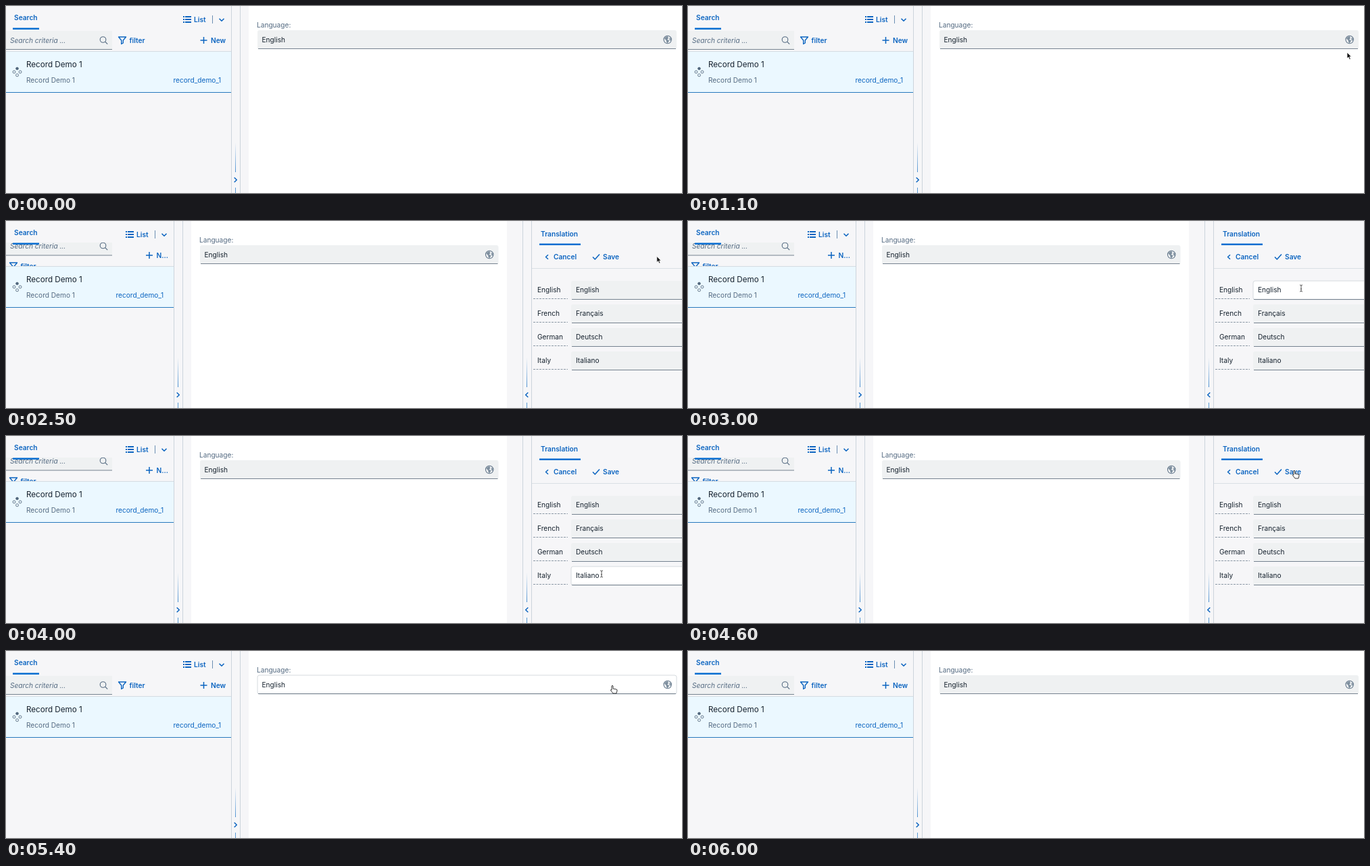
Animation, 1000 px wide and 278 px high, one loop 6800 ms. Source, as an HTML page with a canvas:

```html
<!DOCTYPE html>
<html lang="en">
<head>
<meta charset="utf-8">
<title>Translation panel</title>
<style>
  html, body { margin: 0; width: 100%; height: 100%; overflow: hidden; background: #fff; }
  canvas { display: block; width: 1000px; height: 278px; }
</style>
</head>
<body>
<canvas id="stage"></canvas>
<script>
const WIDTH = 1000, HEIGHT = 278, LOOP = 6800, STEP = 100;
const BLUE = '#0b64c0', INK = '#16222e', LABEL = '#556b82', GREY = '#f6f6f8';
const FIELD = '#eff1f2', EDGE = '#ccd4dc', RULE = '#75828f';
const FONT = 'Inter, "Liberation Sans", sans-serif';

// Time, right edge of the search panel, right edge of the form.
const LAYOUT = [[0, 333, 1004.5], [2100, 333, 1004.5], [2200, 262, 790], [2300, 248, 741],
  [4800, 248, 741], [4900, 262, 785], [5000, 301, 904], [5100, 326, 983], [5200, 333, 1004.5]];

// Time, tip x, tip y.
const POINTER = [[600, 992, 262], [800, 988, 165], [1000, 979, 88], [1100, 975, 69],
  [1200, 978, 54], [1400, 983, 47], [1800, 976, 47], [2200, 974.5, 49], [2400, 972, 50],
  [2800, 935, 60], [2900, 920, 80], [3000, 907, 100], [3300, 893, 122], [3500, 885, 156],
  [3600, 882, 168], [3800, 880, 199], [4000, 881, 205], [4100, 882, 165], [4200, 884, 108],
  [4300, 887, 82], [4400, 891, 58], [4500, 896, 40], [4600, 896, 51], [5500, 896, 51],
  [5600, 895, 82], [5900, 890, 198]];

const ROWS = [['English', 'English'], ['French', 'Français'], ['German', 'Deutsch'], ['Italy', 'Italiano']];

const canvas = document.getElementById('stage');
const ratio = window.devicePixelRatio || 1;
canvas.width = WIDTH * ratio;
canvas.height = HEIGHT * ratio;
const ctx = canvas.getContext('2d');
ctx.scale(ratio, ratio);

function sample(keys, time, column) {
  const next = keys.findIndex(key => key[0] > time);
  if (next < 0) return keys[keys.length - 1][column];
  if (next === 0) return keys[0][column];
  const a = keys[next - 1], b = keys[next];
  return a[column] + (b[column] - a[column]) * (time - a[0]) / (b[0] - a[0]);
}

function box(x, y, w, h, color) {
  ctx.fillStyle = color;
  ctx.fillRect(x, y, w, h);
}

function text(string, x, y, { color = INK, size = 10.15, style = '', align = 'left' } = {}) {
  ctx.font = `${style} ${size}px ${FONT}`;
  ctx.fillStyle = color;
  ctx.textAlign = align;
  ctx.fillText(string, x, y);
}

const bold = (string, x, y) => text(string, x, y, { color: BLUE, style: '600', size: 10.2 });

function stroke(path, x, y, color = BLUE, width = 1.5, fill) {
  ctx.save();
  ctx.translate(x, y);
  const shape = new Path2D(path);
  if (fill) {
    ctx.fillStyle = fill;
    ctx.fill(shape);
  }
  ctx.strokeStyle = color;
  ctx.lineWidth = width;
  ctx.lineJoin = 'round';
  ctx.stroke(shape);
  ctx.restore();
}

function ring(x, y, r, color, width, fill) {
  ctx.beginPath();
  ctx.arc(x, y, r, 0, 7);
  if (fill) {
    ctx.fillStyle = fill;
    ctx.fill();
  }
  ctx.strokeStyle = color;
  ctx.lineWidth = width;
  ctx.stroke();
}

function field(x, y, w, pointer) {
  const h = 28;
  const hover = pointer && pointer.x > x && pointer.x < x + w && pointer.y > y && pointer.y < y + h;
  ctx.beginPath();
  ctx.roundRect(x, y, w, h, 3);
  ctx.fillStyle = hover ? '#fff' : FIELD;
  ctx.fill();
  if (hover) {
    ctx.strokeStyle = '#d5dade';
    ctx.lineWidth = 1;
    ctx.stroke();
  }
  box(x + 1, y + h - 1, w - 2, 1, RULE);
}

function splitter(x, direction) {
  box(x, 0, 1, HEIGHT, EDGE);
  box(x + 13, 0, 1, HEIGHT, EDGE);
  const fade = ctx.createLinearGradient(0, 203, 0, 247);
  fade.addColorStop(0, '#5b9bd500');
  fade.addColorStop(1, '#4a8fd0');
  box(x + 6, 203, 1, 44, fade);
  box(x + 6, 270, 1, 8, '#5b9bd5');
  stroke(`M${-1.8 * direction}-3.5L${1.8 * direction} 0L${-1.8 * direction} 3.5`, x + 6.5, 258.5);
}

function toolbar(left) {
  const wrapped = left < 275;
  const shift = wrapped ? -13.5 : 0;
  ctx.save();
  ctx.beginPath();
  ctx.rect(0, 32, left, 35);
  ctx.clip();
  box(0, 37 + shift, 157, 27, FIELD);
  box(0, 64 + shift, 157, 1, RULE);
  text('Search criteria ...', 6, 54.5 + shift, { color: LABEL, style: 'italic' });
  ring(143.5, 50 + shift, 4.3, LABEL, 1.1);
  stroke('M0 0L3.5 3.5', 146.7, 53.2 + shift, LABEL, 1.2);
  const filterX = wrapped ? 5.5 : 166.5, filterY = wrapped ? 62 : 46;
  stroke('M0 0H11L6.8 5V9L4.2 10.5V5Z', filterX, filterY, BLUE, 1.4);
  bold('filter', filterX + 16, filterY + 8.7);
  const plusX = wrapped ? 212 + (left - 248) * .79 : left - 40.5;
  stroke('M-5 0H5M0-5V5', plusX, 51, BLUE, 1.5);
  bold(wrapped ? 'N...' : 'New', plusX + 10.5, 54.7);
  ctx.restore();
}

function searchPanel(left) {
  box(0, 0, left + 26, HEIGHT, GREY);
  toolbar(left);
  bold('Search', 12, 20.7);
  box(10, 32.5, 39, 2.5, '#0a6ed1');
  for (const y of [15, 19, 23]) {
    box(left - 71, y, 2, 2, BLUE);
    box(left - 68, y, 9, 2, BLUE);
  }
  bold('List', left - 55, 24);
  box(left - 28, 14, 1, 12, '#6b8fb3');
  stroke('M-3.5-1.8L0 1.8L3.5-1.8', left - 14, 20.5);

  box(0, 67, left, 1, '#d5dce2');
  box(0, 68, left, 60, '#ebf8ff');
  box(0, 128, left, 1, '#2779bd');
  ring(16.5, 93, 1.8, '#51667c', 1, '#51667c');
  for (const [x, y] of [[12, 98], [21, 98], [16.5, 102.8]]) ring(x, y, 2, '#687b8e', 1);
  text('Record Demo 1', 30, 90.5, { size: 11.65 });
  text('Record Demo 1', 30, 113.5, { color: LABEL });
  text('record_demo_1', left - 15, 113.5, { color: BLUE, align: 'right' });
  splitter(left, 1);
}

function form(left, right, pointer) {
  const x = left + 39, end = right - 12.5;
  box(left + 26, 0, right - left - 26, HEIGHT, '#fff');
  text('Language:', left + 38, 31.5, { color: LABEL });
  field(x, 36, end - x, pointer);
  text('English', left + 45.5, 53.7);
  const globe = end - 13.3;
  ring(globe, 50, 5.7, '#5f7387', 1.1, '#f3f5f6');
  stroke('M-4-3L0-5L1-2L-1 0L2 1L1 4L-1 5L-2 1L-4-1Z', globe, 50, '#7c8d9d', .4, '#7c8d9d');
  stroke('M3-3L5-1L4 2L3 0Z', globe, 50, '#7c8d9d', .4, '#7c8d9d');
}

function translationPanel(x, pointer) {
  splitter(x - 13, -1);
  bold('Translation', x + 14, 23);
  box(x + 12, 33.5, 61, 2.5, '#0a6ed1');
  stroke('M2-3.3L-1.5 0L2 3.3', x + 23, 53.5);
  bold('Cancel', x + 33, 57);
  stroke('M0 0L3.3 3.5L10-4', x + 91, 53.5);
  bold('Save', x + 106, 57);
  box(x + 1, 70, WIDTH, 1, '#d9dfe4');
  ROWS.forEach(([label, value], i) => {
    const y = 89 + 35 * i;
    text(label, x + 9, y + 16.5);
    ctx.setLineDash([3, 1.5]);
    stroke('M0 0H51', x + 3, y + 26.5, '#8b98a5', 1);
    ctx.setLineDash([]);
    field(x + 59, y, WIDTH - x, pointer);
    text(value, x + 66, y + 16.5);
  });
}

const CURSORS = {
  arrow: ({ x, y }) => stroke('M0 0V9L2 7L3.6 10.5L5.2 9.8L3.7 6.5H6.3Z', x, y, '#fff', .7, '#111'),
  text: ({ x, y }) => stroke('M-2-5Q0-5 0-3.5Q0-5 2-5M0-3.5V3.5M-2 5Q0 5 0 3.5Q0 5 2 5M-1 1H1', x, y, '#444', .9),
  hand: ({ x, y }) => stroke('M0 1Q1-.5 2 1V5L7 6Q8.5 6.5 8 8L7 12H2L-1.5 7.5Q-1.8 6 0 7Z', x, y, '#222', .9, '#fff')
};

function cursorKind(time, { y }) {
  if (time >= 1200 && time < 2200 || time >= 4500 && time < 5600) return 'hand';
  const overRow = y > 89 && (y - 89) % 35 < 28;
  return time >= 3000 && time < 4300 && overRow ? 'text' : 'arrow';
}

function draw(time) {
  const left = sample(LAYOUT, time, 1);
  const right = sample(LAYOUT, time, 2);
  const visible = time >= 600 && time < 6000;
  const pointer = visible && { x: sample(POINTER, time, 1), y: sample(POINTER, time, 2) };

  box(0, 0, WIDTH, HEIGHT, GREY);
  searchPanel(left);
  form(left, right, pointer);
  if (time >= 2200 && time < 4900) translationPanel(right + 36, pointer);
  if (visible) CURSORS[cursorKind(time, pointer)](pointer);
}

const start = performance.now();
function frame() {
  const time = (performance.now() - start) % LOOP;
  draw(Math.floor(time / STEP) * STEP);
  requestAnimationFrame(frame);
}
frame();
</script>
</body>
</html>
```
